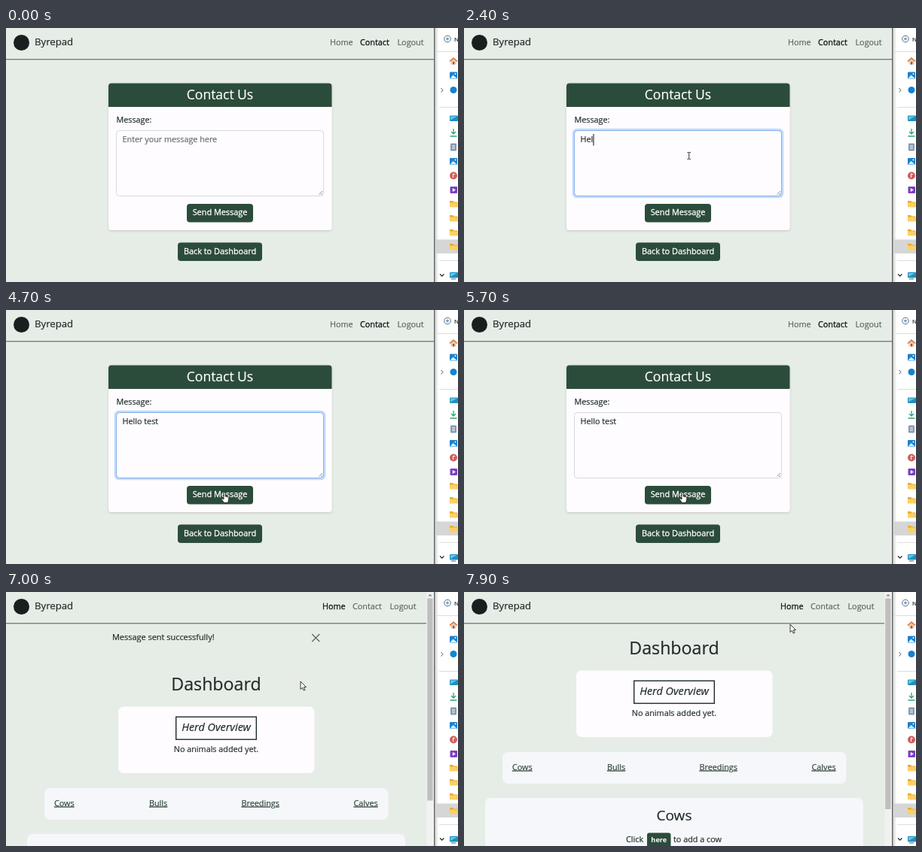
An HTML page for the animation above (8 s loop, 600x338 px).

```html
<!DOCTYPE html>
<html lang="en">
<head>
<meta charset="utf-8">
<title>Contact form</title>
<style>
  html, body { margin: 0; width: 100%; height: 100%; overflow: hidden; background: #e6ece6; }
  svg { display: block; width: 100vw; height: 100vh; }
  text {
    --ink: #1f2b28;
    font: 10.8px "Open Sans", "Noto Sans", sans-serif;
    fill: var(--ink); stroke: var(--ink); stroke-width: .18px; white-space: pre;
  }
  .mid { text-anchor: middle; }
  .brand { font-size: 13.2px; }
  .nav text { --ink: #5b625f; }
  .nav .on { --ink: #0d1512; stroke-width: .3px; }
  .btn { fill: #2c4c3b; }
  .btn-text { font-size: 10.9px; font-weight: 500; --ink: #fff; stroke-width: .3px; }
  .title { font-size: 17.5px; font-weight: 500; --ink: #fff; }
  .h1 { font-size: 23.2px; }
  .h2 { font-size: 19px; }
  .boxed { font-size: 14.4px; font-style: italic; }
  .link { text-decoration: underline; --ink: #2f433a; }
  .hint { --ink: #646a6f; }
  .small { font-size: 9.200px; font-weight: 700; stroke: none; }
  .panel { fill: #f6f7fa; }
</style>
</head>
<body>
<svg viewBox="0 0 600 338" preserveAspectRatio="none">
  <defs>
    <filter id="soft" x="-10%" y="-10%" width="120%" height="125%">
      <feDropShadow dx="0" dy="1.2" stdDeviation="1.6" flood-opacity=".14"/>
    </filter>
    <linearGradient id="edge">
      <stop offset="0" stop-color="#9a9d9b"/>
      <stop offset="1" stop-color="#fff"/>
    </linearGradient>
    <g id="folder">
      <path d="M-5-4h4l1.5 1.5H5V4H-5z" fill="#e9ab2c"/>
      <path d="M-5-1.5H6V4.5H-5z" fill="#fbd065"/>
    </g>
    <g id="picture">
      <rect x="-5" y="-4.5" width="10" height="9" rx="1" fill="#1b82d2"/>
      <path d="M-4.500 4L-.5-.5 4.500 4z" fill="#d9f0ff"/>
      <circle cx="2.500" cy="-2" r="1" fill="#fff"/>
    </g>
    <g id="screen">
      <rect x="-5" y="-4" width="11" height="7.500" rx="1" fill="#1e8fc0"/>
      <path d="M-4-3H5L-4 2z" fill="#5fc7e6"/>
    </g>
  </defs>

  <rect width="569" height="338" fill="#e6ece6"/>

  <g id="contact">
    <rect x="136" y="73.500" width="296.500" height="195.500" rx="4" fill="#fefcfe" filter="url(#soft)"/>
    <path class="btn" d="M136 105V77.500a4 4 0 0 1 4-4H428.500a4 4 0 0 1 4 4V105z"/>
    <text class="title mid" x="284" y="94.500">Contact Us</text>
    <text x="146.500" y="126">Message:</text>
    <rect x="146.500" y="136.500" width="275" height="87" rx="4" fill="#fefcfe" stroke="#d6dade"/>
    <g id="ring" fill="none">
      <rect x="145" y="135" width="278" height="90" rx="5" stroke="#c2dbfe" stroke-width="2.600"/>
      <rect x="146.500" y="136.500" width="275" height="87" rx="4" stroke="#86b0ea"/>
    </g>
    <path d="M415.500 221.500l4.500-4.500M418 222l2-2" stroke="#777" stroke-width=".8"/>
    <text id="hint" class="hint" x="154.500" y="152">Enter your message here</text>
    <text id="typed" x="154.500" y="152"></text>
    <rect id="caret" y="141" width="1" height="15.500" fill="#111"/>
    <rect class="btn" x="240" y="234" width="88" height="24.500" rx="4"/>
    <text class="btn-text mid" x="284" y="249">Send Message</text>
    <rect class="btn" x="228" y="285.500" width="112" height="24.500" rx="4"/>
    <text class="btn-text mid" x="284" y="300.500">Back to Dashboard</text>
  </g>

  <g id="dash">
    <g id="alert">
      <text x="141" y="63.500" style="font-size:10.950px">Message sent successfully!</text>
      <path d="M406.200 56l10 10m0-10l-10 10" stroke="#626965" stroke-width="1.300"/>
    </g>
    <g id="content">
      <text class="h1 mid" x="279" y="130.500">Dashboard</text>
      <rect x="149" y="152.500" width="260.500" height="88.500" rx="7" fill="#fefcfe"/>
      <rect x="225.700" y="166.200" width="106.600" height="30" fill="none" stroke="#1f2b28" stroke-width="1.400"/>
      <text class="boxed mid" x="279" y="185">Herd Overview</text>
      <text class="mid" x="279" y="212.700">No animals added yet.</text>
      <rect class="panel" x="51" y="261" width="456.500" height="42" rx="7"/>
      <text class="link" x="64" y="284.500">Cows</text>
      <text class="link" x="190" y="284.500">Bulls</text>
      <text class="link" x="312.500" y="284.500">Breedings</text>
      <text class="link" x="461.500" y="284.500">Calves</text>
      <rect class="panel" x="28" y="322" width="502" height="120" rx="7"/>
      <text class="h2 mid" x="279" y="352.200">Cows</text>
      <text x="215" y="381">Click</text>
      <rect class="btn" x="243" y="368.500" width="31.500" height="20" rx="3"/>
      <text class="btn-text small mid" x="258.800" y="381">here</text>
      <text x="278" y="381">to add a cow</text>
    </g>
    <rect x="558" width="10" height="338" fill="#f1f1f1"/>
    <path d="M560.500 5.500l2.500-3 2.500 3z" fill="#8a8a8a"/>
    <rect id="thumb" x="559.200" y="8.500" width="7.400" fill="#bfbfbf"/>
  </g>

  <circle cx="20.500" cy="19.500" r="10.500" fill="#17201f"/>
  <text class="brand" x="38" y="23">Byrepad</text>
  <g id="nav" class="nav">
    <text id="home" x="430" y="22.500">Home</text>
    <text id="here" x="470" y="22.500">Contact</text>
    <text x="519.500" y="22.500">Logout</text>
  </g>
  <rect id="rule" y="41.300" height="1" fill="#4c5851"/>

  <g id="files">
    <rect x="568" width="32" height="338" fill="#fff"/>
    <rect x="569" width="5" height="338" fill="url(#edge)" opacity=".5"/>
    <rect x="568" width="1.300" height="338" fill="#5d625f"/>
    <rect x="570" y="281.500" width="30" height="18.500" fill="#d6d6d6"/>
    <path d="M570 31.500h30M575 105.500h25M575 309.500h25" stroke="#dedede"/>
    <g fill="none" stroke="#555">
      <circle cx="586" cy="14.500" r="4.300" stroke="#4b5c70" stroke-width=".9"/>
      <path d="M583.800 14.500h4.400M586 12.300v4.400" stroke="#2c7cc4" stroke-width=".9"/>
      <path d="M577.500 80l2.500 2.700-2.500 2.700"/>
      <path d="M576 327.500l2.700 2.700 2.700-2.700" stroke="#222" stroke-width="1.200"/>
    </g>
    <text x="595" y="18" style="font-size:8px">New</text>
    <g transform="translate(594 44)">
      <path d="M-3.500-1V4.500H3.500V-1L0-4z" fill="#e8c9ae"/>
      <path d="M-5 .5L0-4 5 .5" fill="none" stroke="#d2743a" stroke-width="1.600"/>
      <rect x="-1" y="1" width="2.200" height="3.500" fill="#9a5b34"/>
    </g>
    <use href="#picture" x="594" y="63"/>
    <circle cx="594" cy="82.500" r="4.500" fill="#1583d3"/>
    <use href="#screen" x="594" y="120.500"/>
    <path d="M594 134v7m-3-3l3 3 3-3M589.500 144h9" fill="none" stroke="#2ba573" stroke-width="1.300"/>
    <rect x="590" y="153.500" width="8" height="10" rx="1" fill="#8499ae"/>
    <path d="M592 156.500h4m-4 2h4m-4 2h4" stroke="#fff" stroke-width=".8"/>
    <use href="#picture" x="594" y="177.500"/>
    <circle cx="594" cy="196.500" r="5" fill="#d0605c"/>
    <path d="M593.500 199v-5l2.500 1" fill="none" stroke="#fff"/>
    <rect x="589.500" y="211" width="9.500" height="9" rx="1" fill="#7b3fc0"/>
    <path d="M592.800 213l4 2.500-4 2.500z" fill="#fff"/>
    <use href="#folder" x="594" y="234"/>
    <use href="#folder" x="594" y="253"/>
    <use href="#folder" x="594" y="272"/>
    <use href="#folder" x="594" y="291"/>
    <use href="#screen" x="594" y="329"/>
    <path d="M591 334h6" stroke="#4a6a80"/>
  </g>

  <g id="pointer">
    <path id="beam" d="M-2.200-4.500h1.500L0-4l.7-.5h1.500M0-4V4M-2.200 4.500h1.500L0 4l.7.5h1.500" fill="none" stroke="#333"/>
    <path id="arrow" d="M0 0V10.500L2.500 8.300 4.200 12 6 11.200 4.300 7.600H7.400z" fill="#fff" stroke="#222" stroke-width=".9"/>
    <path id="hand" d="M-1 .5a1.100 1.100 0 0 1 2.200 0V5l3.600 1a1.500 1.500 0 0 1 1.100 1.500L5.300 11 4.300 13.500H-.5L-3.600 9.200C-4.300 8-3 7.300-2 8.200L-1 9z" fill="#fff" stroke="#222" stroke-width=".9"/>
  </g>
</svg>
<script>
  const LOOP = 8000, STEP = 100, FADE = 150;
  const FOCUS = 600, BLUR = 4700, LOADED = 5800, CLOSE = 7450, CLOSED = CLOSE + FADE;
  const MESSAGE = "Hello test";
  const keys = [2000, 2200, 2400, 2500, 2700, 2800, 2900, 3000, 3100, 3300];
  // time, x, y of the pointer
  const path = [
    [100, 600, 300], [500, 299, 170], [3900, 298.5, 170], [4500, 290, 243],
    [6500, 290, 243], [7000, 391, 119], [7300, 410, 60], [7600, 410, 60], [7900, 433, 43]
  ];
  const $ = id => document.getElementById(id);
  const show = (id, on) => { $(id).style.display = on ? "" : "none"; };
  const clamp = v => Math.min(1, Math.max(0, v));
  const inside = ([x, y], l, t, r, b) => x >= l && x <= r && y >= t && y <= b;

  function pointerAt(t) {
    let i = 0;
    while (i < path.length - 2 && t >= path[i + 1][0]) i++;
    const [t0, x0, y0] = path[i], [t1, x1, y1] = path[i + 1];
    const k = clamp((t - t0) / (t1 - t0)), e = k * k * (3 - 2 * k);
    return [x0 + (x1 - x0) * e, y0 + (y1 - y0) * e];
  }

  function shapeAt(p, onDash, t) {
    if (onDash) return t < CLOSED && inside(p, 404, 54, 419, 69) ? "hand" : "arrow";
    if (inside(p, 146, 136, 422, 224)) return "beam";
    return inside(p, 240, 234, 328, 258) || inside(p, 228, 285, 340, 310) ? "hand" : "arrow";
  }

  function drawForm(t) {
    const count = keys.filter(k => k <= t).length;
    const lastKey = count ? keys[count - 1] : FOCUS;
    $("typed").textContent = MESSAGE.slice(0, count);
    show("hint", !count);
    show("caret", t >= FOCUS && t < BLUR && (t - lastKey) % 1060 < 530);
    $("caret").setAttribute("x", 154.7 + (count ? $("typed").getComputedTextLength() : 0));
    $("ring").style.opacity = clamp((t - FOCUS + 50) / FADE) * clamp((BLUR + FADE - t) / FADE);
  }

  function drawDash(t) {
    const closed = t >= CLOSED;
    show("alert", !closed);
    $("alert").style.opacity = clamp((CLOSED - t) / FADE);
    $("content").setAttribute("transform", `translate(0 ${closed ? -48 : 0})`);
    $("thumb").setAttribute("height", closed ? 280.5 : 269);
  }

  function draw(now) {
    const t = Math.floor(now % LOOP / STEP) * STEP;
    const onDash = t >= LOADED;
    show("contact", !onDash);
    show("dash", onDash);
    $("nav").setAttribute("transform", `translate(${onDash ? -10 : 0} 0)`);
    $("home").classList.toggle("on", onDash);
    $("here").classList.toggle("on", !onDash);
    $("rule").setAttribute("width", onDash ? 558 : 568);
    onDash ? drawDash(t) : drawForm(t);

    const p = pointerAt(t), shape = shapeAt(p, onDash, t);
    show("pointer", t > 100);
    $("pointer").setAttribute("transform", `translate(${p})`);
    for (const s of ["beam", "arrow", "hand"]) show(s, s === shape);
    requestAnimationFrame(draw);
  }
  draw(performance.now());
</script>
</body>
</html>
```
